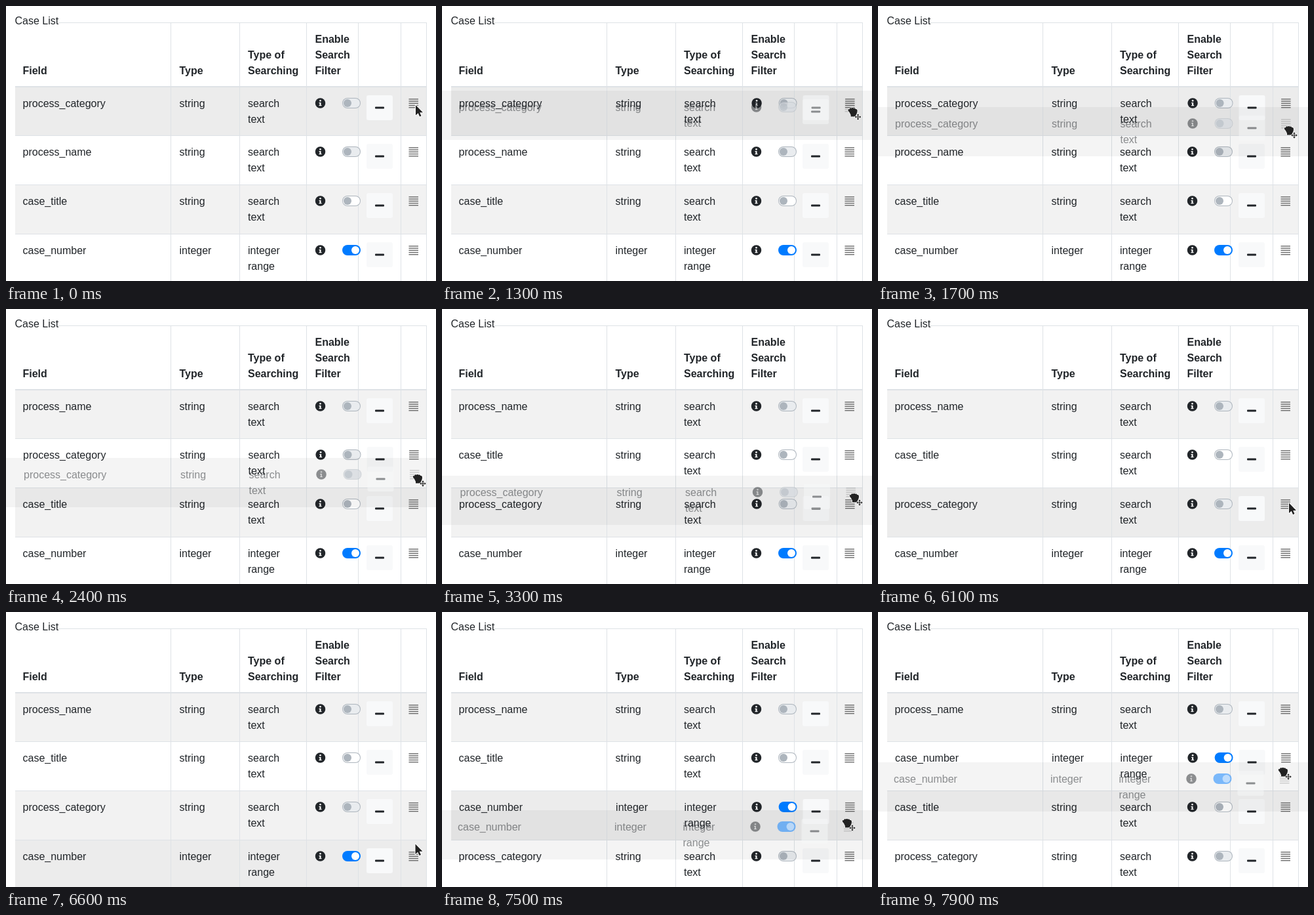
These frames come from a looping animation (656x419 px, 8000 ms). An HTML page with a canvas:

```html
<!DOCTYPE html>
<html lang="en">
<head>
<meta charset="utf-8">
<title>Case List</title>
<style>
  html, body { margin: 0; width: 100%; height: 100%; overflow: hidden; background: #fff; }
  canvas { display: block; width: 656px; height: 419px; }
</style>
</head>
<body>
<canvas id="stage" width="656" height="419"></canvas>
<script>
const ctx = document.getElementById('stage').getContext('2d');
const W = 656, H = 419, LOOP = 8000, STEP = 100;
const INK = '#212529', LINE = '#dee2e6', FONT = '"Liberation Sans", Arial, sans-serif';
const COLUMNS = [251, 356, 458, 537, 602, 641];
const ROW_Y = [0, 74, 149, 224];

const ROWS = {
  category: { name: 'process_category', type: 'string', search: ['search', 'text'], toggle: 'disabled' },
  name: { name: 'process_name', type: 'string', search: ['search', 'text'], toggle: 'disabled' },
  title: { name: 'case_title', type: 'string', search: ['search', 'text'], toggle: 'off' },
  number: { name: 'case_number', type: 'integer', search: ['integer', 'range'], toggle: 'on' }
};

// Row order from a given time on
const ORDERS = [
  [0, 'category name title number'],
  [1900, 'name category title number'],
  [3200, 'name title category number'],
  [7400, 'name title number category'],
  [7800, 'name number title category']
];

// time, x, y of the pointer tip
const POINTER = [
  [1200, 625, 151], [1700, 625.5, 186], [2100, 626, 225], [2400, 626.5, 255],
  [2800, 626.5, 255], [2900, 626.5, 259], [3000, 626.5, 259], [3300, 627.5, 284],
  [6000, 627.5, 284], [6600, 624.5, 353.5], [6800, 618, 362],
  [7200, 618, 362], [7500, 616.5, 318], [7900, 616.5, 240]
];

// time, x and y offset of the dragged copy
const GHOST = [
  [1200, 0, 0], [1700, 0.5, 31], [2100, 1, 72], [2400, 1.5, 104],
  [2800, 1.5, 104], [2900, 1.5, 108], [3000, 1.5, 108], [3300, 2, 131],
  [4300, 2, 131], [7200, 0, 224], [7500, -1.5, 179], [7900, -1.5, 106]
];

function at(keys, t) {
  const i = keys.findIndex(k => k[0] > t);
  if (i === 0) return keys[0].slice(1);
  if (i < 0) return keys[keys.length - 1].slice(1);
  const a = keys[i - 1], b = keys[i], f = (t - a[0]) / (b[0] - a[0]);
  return [a[1] + (b[1] - a[1]) * f, a[2] + (b[2] - a[2]) * f];
}

function rect(x, y, w, h, color) {
  ctx.fillStyle = color;
  ctx.fillRect(x, y, w, h);
}

function box(x, y, w, h, r, color) {
  ctx.fillStyle = color;
  ctx.beginPath();
  ctx.roundRect(x, y, w, h, r);
  ctx.fill();
}

function disc(x, y, r, color) {
  ctx.fillStyle = color;
  ctx.beginPath();
  ctx.arc(x, y, r, 0, Math.PI * 2);
  ctx.fill();
}

function text(s, x, y, bold) {
  ctx.font = (bold ? 'bold ' : '') + '16px ' + FONT;
  ctx.fillStyle = INK;
  ctx.fillText(s, x, y);
}

function infoIcon(x, y) {
  disc(x, y, 7.75, INK);
  disc(x, y - 3.7, 1.35, '#fff');
  rect(x - 1, y - 1, 2, 5, '#fff');
  rect(x - 2, y - 1, 2, 1.2, '#fff');
  rect(x - 2, y + 3, 4, 1.2, '#fff');
}

function toggle(x, y, kind) {
  const on = kind === 'on';
  box(x, y, 28, 16, 8, on ? '#007bff' : '#adb5bd');
  if (!on) box(x + 1, y + 1, 26, 14, 7, kind === 'off' ? '#fff' : '#e9ecef');
  disc(x + (on ? 20 : 8), y + 8, 6, on ? '#fff' : '#adb5bd');
}

// Cells of one row, placed as in the first row and moved by dx, dy
function cells(row, dx, dy, kind = row.toggle, alpha = 1) {
  ctx.save();
  ctx.globalAlpha = alpha;
  ctx.translate(dx, dy);
  box(550, 136, 40, 38, 3, '#f8f9fa');
  box(563, 153.5, 14, 3, 1, INK);
  text(row.name, 25.5, 154);
  text(row.type, 264.5, 154);
  row.search.forEach((s, i) => text(s, 369, 154 + 24 * i));
  infoIcon(479.5, 148);
  toggle(513, 140, kind);
  ctx.globalAlpha = alpha < 1 ? alpha * 0.6 : 1;
  for (let i = 0; i < 5; i++) rect(614.5, 141.2 + i * 3.2, 14.5, 1.4, '#6c6c6c');
  ctx.restore();
}

function header() {
  rect(80, 25, 562, 1, LINE);
  text('Case List', 13.5, 28);
  text('Field', 25.5, 104, true);
  text('Type', 264.5, 104, true);
  ['Type of', 'Searching'].forEach((s, i) => text(s, 369, 80 + 24 * i, true));
  ['Enable', 'Search', 'Filter'].forEach((s, i) => text(s, 471.5, 56 + 24 * i, true));
}

function grid() {
  COLUMNS.forEach(x => rect(x, 25, 1, H, LINE));
  rect(14, 122, 628, 2, LINE);
  ROW_Y.slice(1).forEach(y => rect(14, 123 + y, 628, 1, LINE));
}

function shape(path, x, y, line) {
  ctx.save();
  ctx.translate(x, y);
  ctx.lineJoin = 'round';
  ctx.strokeStyle = '#fff';
  ctx.lineWidth = line;
  ctx.stroke(path);
  ctx.fillStyle = '#222';
  ctx.fill(path);
  ctx.restore();
}

const ARROW = new Path2D('M0 0V15.5L3.7 12.2L6.1 17.6L8.5 16.5L6.2 11.3H11Z');
const FIST = new Path2D('M-5 0C-7-2-8-4-6.5-5L-5-4.5V-5C-4.5-7-2.5-7-2-6.2C-1-7.5 1-7 1.4-6C2.5-7 4-6.2 4.3-5C6-5.5 7-4.2 7-2.5C7 1 6 2 5 4V6.5H-3V4Z');
const MOVE = new Path2D('M0-4.8L2-2.5H.6V-.6H2.5V-2L4.8 0L2.5 2V.6H.6V2.5H2L0 4.8L-2 2.5H-.6V.6H-2.5V2L-4.8 0L-2.5-2V-.6H-.6V-2.5H-2Z');

function pointer(x, y, held) {
  if (!held) return shape(ARROW, x, y, 2);
  shape(FIST, x + 1.5, y + 4, 1.4);
  shape(MOVE, x + 9.5, y + 11, 1.6);
}

function hovered(t, y) {
  if (t < 1900) return 0;
  if (t < 6100 || t >= 7800) return -1;
  if (t >= 7400) return 2;
  return t >= 7300 || y >= 348 ? 3 : 2;
}

function draw(t) {
  const order = ORDERS.filter(o => o[0] <= t).pop()[1].split(' ');
  const [px, py] = at(POINTER, t);
  const first = t >= 1300 && t < 4300, held = first || t >= 7300;
  const moved = t >= 1300 && t < 4500 ? 'category' : t >= 7300 ? 'number' : '';
  const hover = hovered(t, py);
  const settling = t >= 4500 && t < 4700;

  rect(0, 0, W, H, '#fff');
  ROW_Y.forEach((y, i) => {
    const color = i === hover ? '#ececec' : i % 2 ? '#fff' : '#f2f2f2';
    rect(14, 124 + y, 628, 74, color);
  });
  grid();
  header();
  order.forEach((id, i) => {
    let kind = ROWS[id].toggle;
    if (settling && i === 1) kind = 'disabled';
    if (settling && i === 2) kind = 'off';
    cells(ROWS[id], id === moved ? 0.6 : 0, ROW_Y[i], kind);
  });

  if (held) {
    const [gx, gy] = at(GHOST, t);
    rect(0, Math.round(123 + gy), W, 75, 'rgba(0,0,0,0.045)');
    cells(ROWS[first ? 'category' : 'number'], gx, Math.round(gy), undefined, 0.5);
  }
  pointer(px, py, held);
}

const start = performance.now();
function frame() {
  const t = (performance.now() - start) % LOOP;
  draw(Math.floor(t / STEP) * STEP);
  requestAnimationFrame(frame);
}
frame();
</script>
</body>
</html>
```
